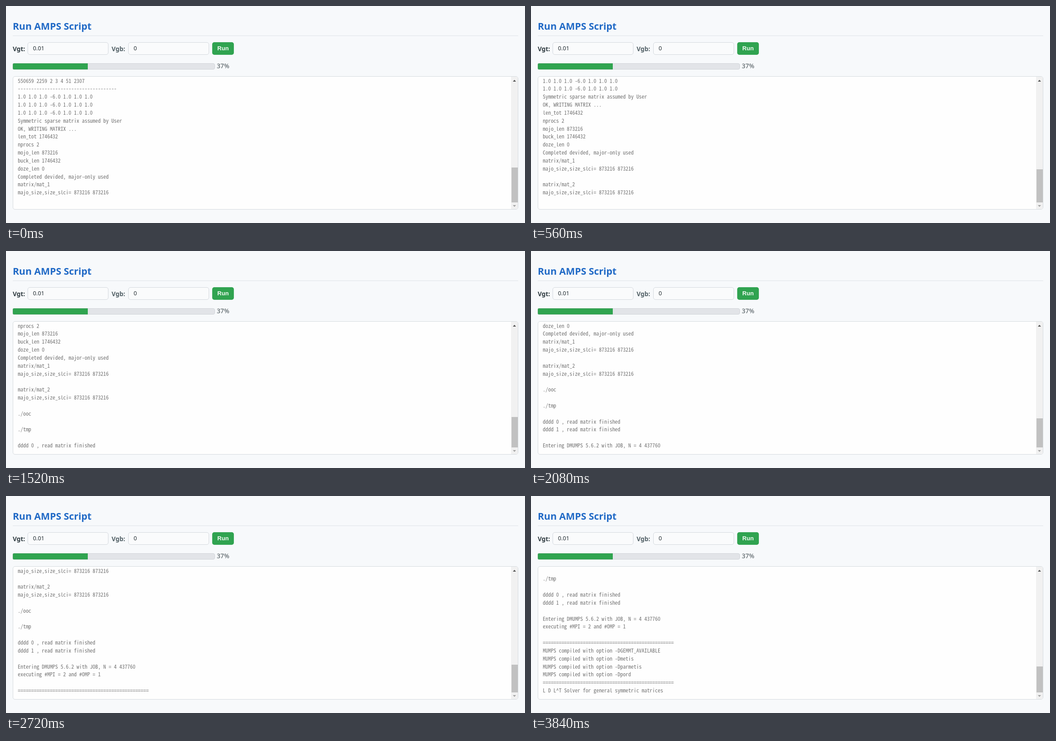
Animation of 1155 by 485 pixels, one loop 4.08 s. Source, as an HTML page:

```html
<!DOCTYPE html>
<html lang="en">
<head>
<meta charset="utf-8">
<title>Run AMPS Script</title>
<style>
  html, body { margin: 0; width: 100%; height: 100%; overflow: hidden; }
  body { position: relative; background: #f7f9fb; color: #465156; font-family: "Noto Sans", "Open Sans", sans-serif; }
  body * { position: absolute; box-sizing: border-box; margin: 0; white-space: pre; }
  h1 { left: 15px; top: 30px; font-size: 21.4px; font-weight: 700; line-height: 30px; color: #216ac6; }
  .rule { left: 15px; top: 66px; width: 1125px; height: 1px; background: #dfe3e7; }
  .label { top: 82px; line-height: 28px; font-size: 13.8px; font-weight: 600; color: #2f3b40; }
  .label.soft { color: #526066; }
  .field { top: 81px; width: 180px; height: 28px; padding-left: 11px; border: 1px solid #d3d8dd; border-radius: 5px;
           background: #fafbfc; font-size: 12.8px; line-height: 25px; color: #242e33; }
  .run { left: 459px; top: 81px; width: 48px; height: 28px; border-radius: 5px; background: #30a350; color: #f4faf5;
         box-shadow: 0 0 1px #30a350; font: 700 13px/27px "Liberation Sans", Arial, sans-serif; text-align: center; }
  .bar { left: 15px; top: 128px; width: 450px; height: 14px; border: 1px solid #d0d3d8; border-radius: 4px; background: #e2e4e8; }
  .fill { left: 15px; top: 128px; width: 167px; height: 14px; border: 1px solid #4a9f64; border-right: 0;
          border-radius: 3px 0 0 3px; background: #2fa44f; }
  .percent { left: 469px; top: 120px; font-size: 14.2px; line-height: 28px; }
  .panel { left: 15px; top: 157px; width: 1125px; height: 298px; border: 1px solid #d5dade; border-radius: 5px;
           background: #fefefe; overflow: hidden; }
  #log { left: 10.3px; top: -0.4px; color: #727272; font-family: "Noto Sans Mono CJK SC", "Noto Sans Mono CJK JP", "Liberation Mono", monospace;
         font-size: 11.9px; font-size-adjust: ch-width 0.5; line-height: 17.83px; font-variant-ligatures: none; }
  .track { right: 0; top: 0; width: 15px; height: 296px; background: #f1f1f1; }
  #thumb { left: 1px; bottom: 15px; width: 14px; background: #c1c1c1; }
  .arrow { left: 4px; width: 7px; height: 4px; }
  .up { top: 7px; background: #505050; clip-path: polygon(50% 0, 100% 100%, 0 100%); }
  .down { top: 287px; background: #a3a3a3; clip-path: polygon(0 0, 100% 0, 50% 100%); }
</style>
</head>
<body>
<h1>Run AMPS Script</h1>
<div class="rule"></div>
<div class="label" style="left:15px">Vgt:</div>
<div class="field" style="left:48px">0.01</div>
<div class="label soft" style="left:235px">Vgb:</div>
<div class="field" style="left:272px">0</div>
<div class="run">Run</div>
<div class="bar"></div>
<div class="fill"></div>
<div class="percent">37%</div>
<div class="panel">
  <div id="log"></div>
  <div class="track">
    <div class="arrow up"></div>
    <div id="thumb"></div>
    <div class="arrow down"></div>
  </div>
</div>
<script>
  const stencil = "1.0 1.0 1.0 -6.0 1.0 1.0 1.0";
  const size = "majo_size,size_slci= 873216 873216";
  const rule = "=".repeat(49);
  const option = name => "MUMPS compiled with option -D" + name;

  const lines = [
    "550659 2259 2 3 4 51 2307", "-".repeat(37), stencil, stencil, stencil,
    "Symmetric sparse matrix assumed by User", "OK, WRITING MATRIX ...",
    "len_tot 1746432", "nprocs 2", "mojo_len 873216", "buck_len 1746432", "doze_len 0",
    "Completed devided, major-only used",
    "matrix/mat_1", size, "", "matrix/mat_2", size, "",
    "./ooc", "", "./tmp", "",
    "dddd 0 , read matrix finished", "dddd 1 , read matrix finished", "",
    "Entering DMUMPS 5.6.2 with JOB, N = 4 437760", "executing #MPI = 2 and #OMP = 1", "",
    rule, ...["GEMMT_AVAILABLE", "metis", "parmetis", "pord"].map(option), rule,
    "L D L^T Solver for general symmetric matrices"
  ];

  const LOOP = 4080, TICK = 80, LINE_TIME = 192;
  const ROWS = 16, LINE = 17.83, VIEW = 296, TRACK = 266, START_HEIGHT = 1012;
  const log = document.getElementById("log");
  const thumb = document.getElementById("thumb");
  let shown = -1;

  // One new line every 192 ms, snapped to the nearest 80 ms tick.
  function draw() {
    const tick = Math.floor(performance.now() % LOOP / TICK);
    const first = Math.min(lines.length - ROWS, Math.floor((tick + 0.5) * TICK / LINE_TIME));
    if (first !== shown) {
      shown = first;
      log.textContent = lines.slice(first, first + ROWS).join("\n");
      thumb.style.height = TRACK * VIEW / (START_HEIGHT + first * LINE) + "px";
    }
    requestAnimationFrame(draw);
  }
  draw();
</script>
</body>
</html>
```
